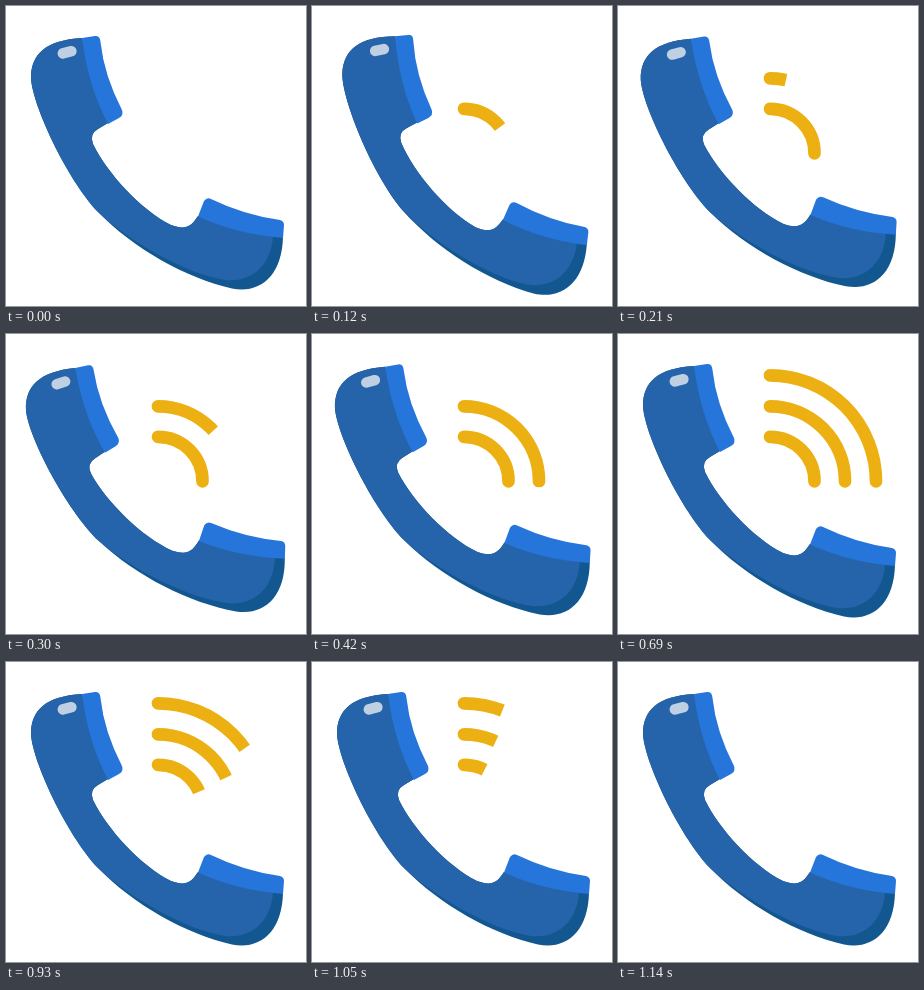
An HTML page with a canvas that plays this animation: 300 px wide and 300 px high, repeating every 1.17 s.

```html
<!DOCTYPE html>
<html lang="en">
<head>
<meta charset="utf-8">
<title>Ringing phone</title>
<style>
  html, body { margin: 0; width: 100%; height: 100%; overflow: hidden; background: #fff; }
  canvas { display: block; width: 300px; height: 300px; }
</style>
</head>
<body>
<canvas id="stage" width="300" height="300"></canvas>
<script>
const ctx = document.getElementById('stage').getContext('2d');
const LOOP = 1170, STEP = 30, RING_END = 540;
const FADE_START = 780, FADE_END = 1140;
const PIVOT = { x: 116, y: 187 };
const CENTER = { x: 152, y: 147.3 };
const rad = deg => deg * Math.PI / 180;

// Upper edge shared by the shaded and the lit body, from mouthpiece to earpiece.
const upperEdge = 'L192 210 C186 219 181 225 165 219 C135 204 101 167 87 138 ' +
  'Q83 128 92 123 L102 117 L76 32 C40 34 25 48 25 72 C26 98 60 172 92 206 ';

const phone = [
  ['#12578f', 'M277 231 ' + upperEdge + 'C128 243 180 272 226 282.5 C254 288 276 270 277 231Z'],
  ['#2563aa', 'M267 231 ' + upperEdge + 'C124 236 178 267 219 274 C247 277 265 258 267 231Z'],
  ['#2575db', 'M76 32 L89 30 Q94 29 94.5 36 Q98 69 116 104 Q118 109 113 112 L102 118 Q82 80 76 32Z'],
  ['#2575db', 'M192 210.5 L198 195 Q201 191 205 193 Q238 209 274 214 Q278 215 278 219 L277 232 Q230 228 192 210.5Z']
].map(([color, d]) => ({ color, path: new Path2D(d) }));

// Each wave is revealed from angle a to b (degrees clockwise from the top).
const waves = [
  { r: 44.5, a: -8, b: 116, start: 0, end: 240, last: -2 },
  { r: 75, a: -5, b: 115, start: 166, end: 472, last: -5 },
  { r: 106, a: -4, b: 97, start: 420, end: 690, last: -4 }
];

function progress(t, start, end) {
  return Math.min(1, Math.max(0, (t - start) / (end - start)));
}

function swing(t) {
  if (t >= RING_END) return 0;
  return 5 * (1 - t / 620) * Math.sin(2 * Math.PI * 5 * t / RING_END);
}

function drawPhone(t) {
  ctx.save();
  ctx.translate(PIVOT.x, PIVOT.y);
  ctx.rotate(rad(swing(t)));
  ctx.translate(-PIVOT.x, -PIVOT.y);
  for (const part of phone) {
    ctx.fillStyle = part.color;
    ctx.fill(part.path);
  }
  ctx.strokeStyle = '#bfd0e3';
  ctx.lineWidth = 10.5;
  ctx.beginPath();
  ctx.moveTo(56.8, 47.4);
  ctx.lineTo(65.4, 45.2);
  ctx.stroke();
  ctx.restore();
}

function drawWave(wave, t) {
  const shown = progress(t, wave.start, wave.end);
  const hidden = progress(t, FADE_START, FADE_END);
  if (shown === 0 || hidden === 1) return;
  const tip = hidden > 0
    ? wave.b + (wave.last - wave.b) * hidden
    : wave.a + (wave.b - wave.a) * shown;
  ctx.save();
  ctx.beginPath();
  ctx.moveTo(CENTER.x, CENTER.y);
  ctx.arc(CENTER.x, CENTER.y, 140, rad(-120), rad(tip - 90));
  ctx.clip();
  ctx.strokeStyle = '#edb013';
  ctx.lineWidth = 12.7;
  ctx.beginPath();
  ctx.arc(CENTER.x, CENTER.y, wave.r, rad(-90), 0);
  ctx.stroke();
  ctx.restore();
}

function render(now) {
  const t = Math.floor(now % LOOP / STEP) * STEP;
  ctx.fillStyle = '#fff';
  ctx.fillRect(0, 0, 300, 300);
  ctx.lineCap = 'round';
  drawPhone(t);
  waves.forEach(wave => drawWave(wave, t));
}

let origin;
function tick(now) {
  origin ??= now;
  render(Math.max(0, now - origin));
  requestAnimationFrame(tick);
}
render(0);
requestAnimationFrame(tick);
</script>
</body>
</html>
```
